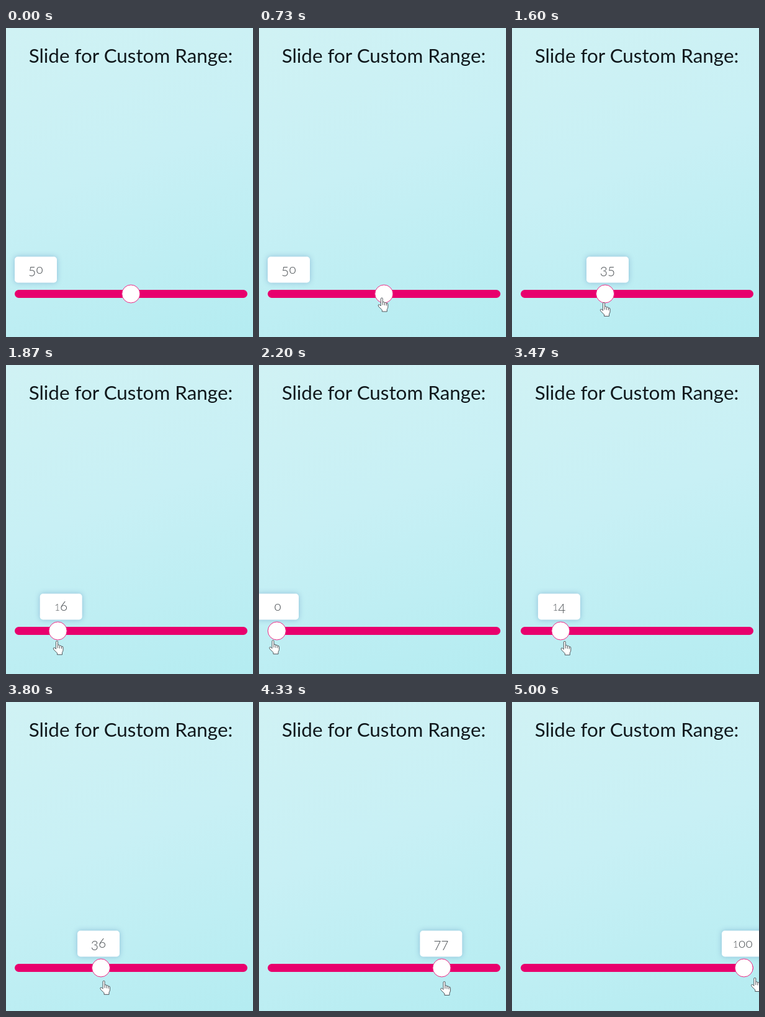
These frames come from a looping animation (398 by 498 pixels, 5.14 s). An HTML page:

```html
<!DOCTYPE html>
<html lang="en">
<head>
<meta charset="utf-8">
<title>Custom range slider</title>
<style>
  html, body { margin: 0; width: 100%; height: 100%; overflow: hidden; }
  body {
    position: relative;
    background: linear-gradient(160deg, #d0f2f4, #c8f0f5 45%, #b4ecf1);
    font-family: Lato, sans-serif;
  }
  h1 {
    position: absolute; left: 0; top: 24px; width: 402px; margin: 0;
    font-size: 31.4px; font-weight: 400; line-height: 40px;
    text-align: center; white-space: nowrap; color: #10181c;
  }
  .track {
    position: absolute; left: 14px; top: 421.5px; width: 375px; height: 13px;
    border-radius: 7px; background: #e8006d;
  }
  .thumb, .bubble, .hand { position: absolute; left: 0; top: 0; }
  .thumb {
    box-sizing: border-box; width: 30px; height: 30px; border-radius: 50%;
    background: #fff; border: 1.2px solid #ea2a86;
  }
  .bubble {
    width: 68px; height: 42px; border-radius: 5px; background: #fff;
    box-shadow: 0 0 9px rgba(85, 130, 185, .45);
    font-size: 21px; font-weight: 300; line-height: 38px;
    text-align: center; color: #4c5155;
  }
  .bubble span { position: relative; }
  .low { top: 4px; }
  .small { font-size: 15px; }
  .hand { width: 17px; height: 23px; overflow: visible; }
  .hand path { fill: #fff; stroke: #40444a; stroke-width: .9; stroke-linejoin: round; }
</style>
</head>
<body>
<h1>Slide for Custom Range:</h1>
<div class="track"></div>
<div class="bubble"></div>
<div class="thumb"></div>
<svg class="hand" viewBox="0 0 17 23">
  <path d="M5 13V2Q5 .5 6.6 .5T8 2V7.5Q8.5 6.5 10 7T11 8.5Q12 7.5 13.3 8.3T14 9.5Q16.5 8.5 16.5 11V15Q16.5 17 15 19V22.5H7V20L1.5 14.5Q0 12 1.5 11.3T5 13.5ZM8 7.5V12M11 8.5V12.5M14 9.5V13"/>
</svg>
<script>
  const LOOP = 5140;
  const STEP = 1000 / 15;
  const LAST_STEP = 75;
  const BUBBLE_LAG = 0.25;

  const linear = t => t;
  const settle = t => 1 - (1 - t) ** 3;
  const speedUp = power => t => t ** power;

  // The hand's place (x, y) is relative to the thumb's top left corner.
  const move = (from, to, x, y) =>
    ({ from, to, target: { x, y }, ease: { x: linear, y: linear } });
  const drag = (from, to, value, x, y, power = 1) =>
    ({ from, to, target: { value, x, y }, ease: { value: speedUp(power), x: settle, y: settle } });

  const START = { value: 50, x: 76, y: 86 };
  const firstDrag = drag(20, 31, 0, 7, 31, 1.2);
  const LEGS = [
    move(1, 11, 5, 21),
    firstDrag,
    move(31, 36, -5, 28),
    move(36, 38, 19, 22.5),
    drag(47, 64.75, 77, 12.5, 36.5, 1.325),
    drag(65, 69, 100, 8, 34.5),
    move(70, 75, 26, 30.5),
  ];

  const [bubble, thumb, hand] = ['.bubble', '.thumb', '.hand']
    .map(name => document.querySelector(name));

  function poseAt(step) {
    const pose = { ...START };
    for (const { from, to, target, ease } of LEGS) {
      const t = Math.max(0, Math.min(1, (step - from) / (to - from)));
      for (const key in target) pose[key] += (target[key] - pose[key]) * ease[key](t);
    }
    return pose;
  }

  function place(element, x, y) {
    element.style.transform = `translate(${x}px, ${y}px)`;
  }

  // Old-style figures: round zero, short 1 and 2, hanging 3 4 5 7 9.
  function figure(digit) {
    if (digit === '0') return '<span>o</span>';
    const style = '12'.includes(digit) ? 'small' : '68'.includes(digit) ? '' : 'low';
    return `<span class="${style}">${digit}</span>`;
  }

  let shown = '';
  function draw(time) {
    const step = Math.min(LAST_STEP, Math.floor((time + 5) / STEP));
    const { value, x, y } = poseAt(step);
    const trailing = poseAt(step - BUBBLE_LAG).value;
    const left = 13.8 + 3.45 * value, top = 413.5;
    place(thumb, left, top);
    place(hand, left + x, top + y);
    place(bubble, step < firstDrag.from ? 14 : -4 + 3.42 * trailing, 368.5);
    hand.style.visibility = step < 1 ? 'hidden' : 'visible';

    const text = String(Math.round(value));
    if (text !== shown) {
      bubble.innerHTML = [...text].map(figure).join('');
      shown = text;
    }
  }

  const start = performance.now();
  function tick() {
    draw((performance.now() - start) % LOOP);
    requestAnimationFrame(tick);
  }
  tick();
</script>
</body>
</html>
```
